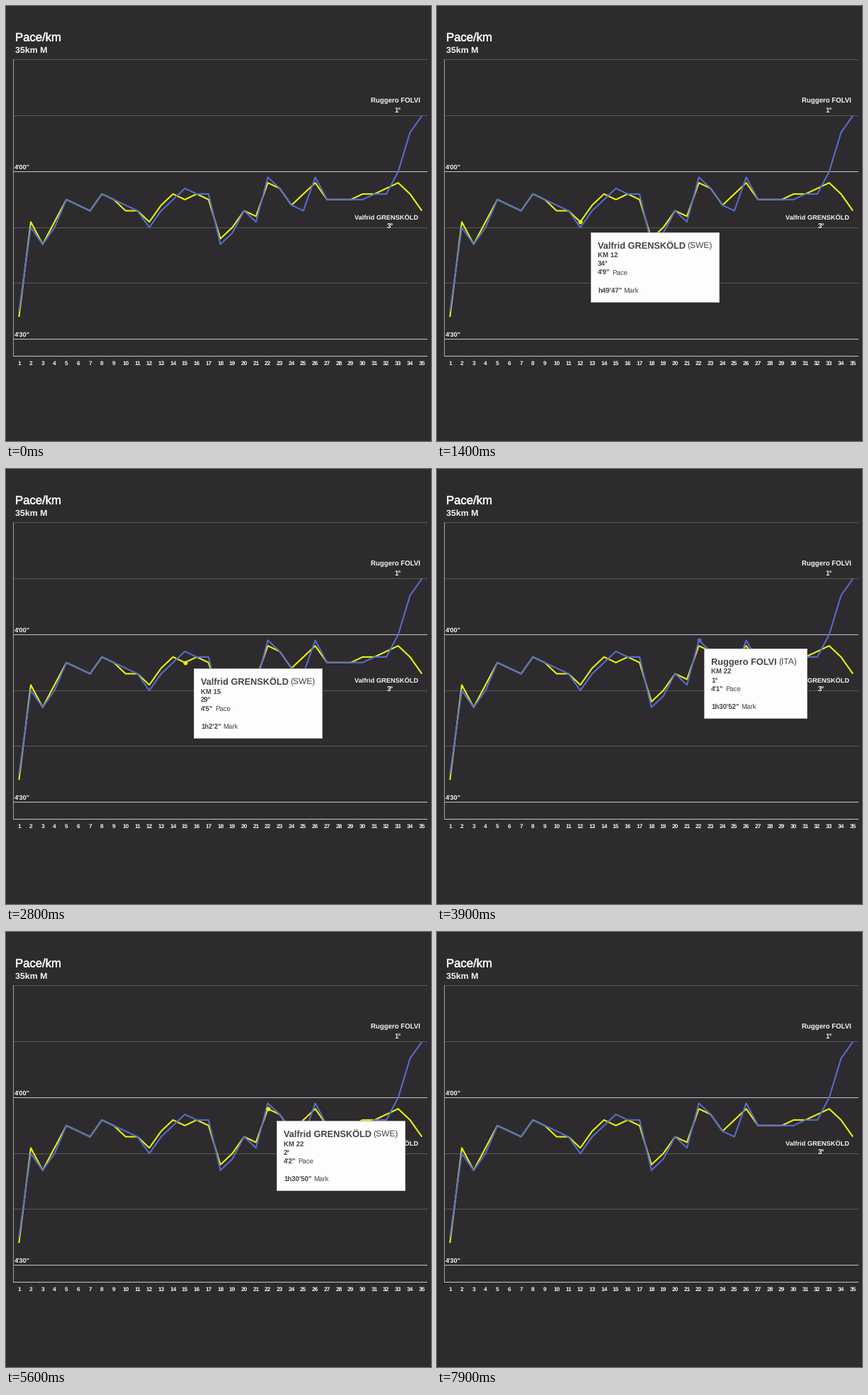
Write a matplotlib script that moves like this. It is 600 px wide and 613 px high and loops after 8 s.

```python
import matplotlib.pyplot as plt
import numpy as np
from matplotlib import patheffects
from matplotlib.animation import FuncAnimation
from matplotlib.patches import Rectangle

plt.rcParams["text.hinting"] = "none"

W, H, DPI = 600, 613, 100
PT = 72 / DPI  # points per pixel
STEP_MS, FRAMES = 100, 80
BG, INK, WHITE = "#2d2b2d", "#444345", "#f4f4f4"
BRIGHT, DIM, AXIS = "#c6c6c6", "#5a595a", "#a0a0a0"
GRID_TOP, GRID_STEP = 75.4, 78.75  # ten seconds per grid step
LEFT, RIGHT, BOTTOM = 10, 595, 493

KM = np.arange(1, 36)
KM_X = 18.3 + (KM - 1) * 16.73

# Turning points, km: seconds over four minutes; straight runs in between
TURNS = {1: 26, 2: 9, 3: 13, 5: 5, 7: 7, 8: 4, 10: 6.9, 11: 7, 12: 9, 14: 4,
         15: 5, 16: 4, 17: 5, 18: 12, 20: 7, 21: 8, 22: 2, 23: 3, 24: 6,
         26: 2, 27: 5, 29: 5, 33: 2, 35: 7}
# Where the winner leaves the shared rhythm
BREAKS = {1: 25, 10: 6, 14: 5, 15: 3, 17: 4, 25: 7, 32: 4, 33: 1, 34: -6,
          35: -9}


def fill(turns):
    kms = sorted(turns)
    pace = np.interp(KM, kms, [turns[k] for k in kms])
    return np.round(pace).astype(int)


def swing(pace):
    """One second slower on slow kilometres, one quicker on fast ones."""
    return pace + ((pace >= 8) & (pace <= 12)) - (pace <= 2)


YELLOW = dict(name="Valfrid GRENSKÖLD", nation="(SWE)", color="#e8f20c",
              width=181, lead=2, pace=fill(TURNS))
BLUE = dict(name="Ruggero FOLVI", nation="(ITA)", color="#566ccb",
            width=145, lead=1, pace=swing(fill({**TURNS, **BREAKS})))
RUNNERS = (YELLOW, BLUE)


def pace_y(seconds):
    return GRID_TOP + GRID_STEP * (2 + np.asarray(seconds) / 10) + 0.5


# Tooltip stops: arrival in ms, corner x, y
SHOW, HIDE, GLIDE = 700, 7000, 600
STOPS = [(SHOW, 217, 319), (2100, 243, 288), (2800, 265, 281),
         (3900, 377, 253), (4900, 382, 266)]
CURSOR = np.array([11, 14])  # corner's distance from the pointer

fig = plt.figure(figsize=(W / DPI, H / DPI), dpi=DPI, facecolor=BG)
ax = fig.add_axes([0, 0, 1, 1])
ax.set(xlim=(0, W), ylim=(H, 0))
ax.axis("off")


def label(x, y, text, size, color=WHITE, weight="bold", ha="left", z=4):
    return ax.text(x, y, text, fontsize=size * PT, color=color, ha=ha,
                   va="baseline", family="Liberation Sans", weight=weight,
                   zorder=z)


def bar(x, y, w, h, color):
    ax.add_patch(Rectangle((x, y), w, h, fc=color, ec="none", zorder=1))


def draw_chart():
    title = label(13, 49.5, "Pace/km", 16.7, weight="normal")
    title.set_path_effects(
        [patheffects.withStroke(linewidth=0.5 * PT, foreground=WHITE)])
    label(13, 66, "35km M", 12.4)
    for k in range(6):
        y = np.round(GRID_TOP + GRID_STEP * k)
        bar(LEFT, y, RIGHT - LEFT, 1, BRIGHT if k in (2, 5) else DIM)
    bar(LEFT, BOTTOM, RIGHT - LEFT, 1, BRIGHT)
    bar(LEFT, 75, 1, BOTTOM - 74, AXIS)
    for seconds in (0, 30):
        label(12, pace_y(seconds) - 3.5, f"4'{seconds:02d}\"", 9.3)
    for km, x in zip(KM, KM_X):
        label(x, 505.5, str(km), 8.4, ha="center")
    for z, runner in enumerate(RUNNERS, 2):
        ax.plot(KM_X, pace_y(runner["pace"]), color=runner["color"],
                lw=2.1 * PT, zorder=z, solid_joinstyle="round",
                solid_capstyle="butt")
    label(549.5, 137, BLUE["name"], 9.7, ha="center")
    label(553, 150, "1°", 9.7, ha="center")
    label(537, 301, YELLOW["name"], 9.3, ha="center")
    label(542, 314, "3°", 9.7, ha="center")


draw_chart()

PAD, BOX_H = 10, 98
dot, = ax.plot([], [], "o", ms=6 * PT, mew=0, zorder=5)
box = Rectangle((0, 0), 1, BOX_H, fc="#fdfdfd", ec="#bdbdbd", lw=PT, zorder=6)
ax.add_patch(box)

# Tooltip baselines: a heading, three lines, a gap and the last line
BASELINES = [22.5] + [35.5 + 12.3 * k for k in (0, 1, 2, 4)]
bold = [label(0, 0, "", 9.7, INK, z=7) for _ in BASELINES]
plain = [label(0, 0, "", 9.7, INK, "normal", z=7) for _ in BASELINES]
bold[0].set_fontsize(12.7 * PT)
plain[0].set_fontsize(12 * PT)
tooltip = [dot, box, *bold, *plain]


def corner_at(ms):
    pos = np.array(STOPS[0][1:], float)
    for arrive, *goal in STOPS[1:]:
        part = np.clip((ms - arrive) / GLIDE + 1, 0, 1)
        pos += (goal - pos) * part
    return pos


def nearest(ms):
    """Runner and kilometre index closest to the pointer."""
    px, py = corner_at(ms) - CURSOR
    dist = [np.hypot(KM_X - px, pace_y(r["pace"]) - py) for r in RUNNERS]
    who, i = np.unravel_index(np.argmin(dist), (len(RUNNERS), len(KM)))
    return RUNNERS[who], i


def mark_text(runner, i):
    total = 240 * (i + 1) + runner["pace"][:i + 1].sum()
    hours, rest = divmod(total, 3600)
    return f"{hours or ''}h{rest // 60}'{rest % 60}\""


def tooltip_rows(runner, i):
    rank = round(np.interp(i + 1, [14, 15, 22], [34, 29, runner["lead"]]))
    return [(runner["name"], runner["nation"]),
            (f"KM {i + 1}", ""),
            (f"{rank}°", ""),
            (f"4'{runner['pace'][i]}\"", "Pace"),
            (mark_text(runner, i), "Mark")]


def update(n):
    ms = n * STEP_MS
    shown = SHOW <= ms < HIDE
    for part in tooltip:
        part.set_visible(shown)
    if not shown:
        return tooltip

    runner, i = nearest(ms)
    x, y = np.round(corner_at(ms))
    dot.set_data([KM_X[i]], [pace_y(runner["pace"][i])])
    dot.set_color(runner["color"])
    box.set_xy((x, y))
    # The box takes its new width one step after the text
    box.set_width(nearest(ms - STEP_MS)[0]["width"])
    for base, head, tail, texts in zip(BASELINES, bold, plain,
                                       tooltip_rows(runner, i)):
        head.set_text(texts[0])
        head.set_position((x + PAD, y + base))
        tail.set_text(texts[1])
        end = x + PAD + head.get_window_extent().width
        tail.set_position((end + 2.5, y + base))
    return tooltip


anim = FuncAnimation(fig, update, frames=FRAMES, interval=STEP_MS,
                     repeat=True, repeat_delay=0, blit=False)
plt.show()
```
